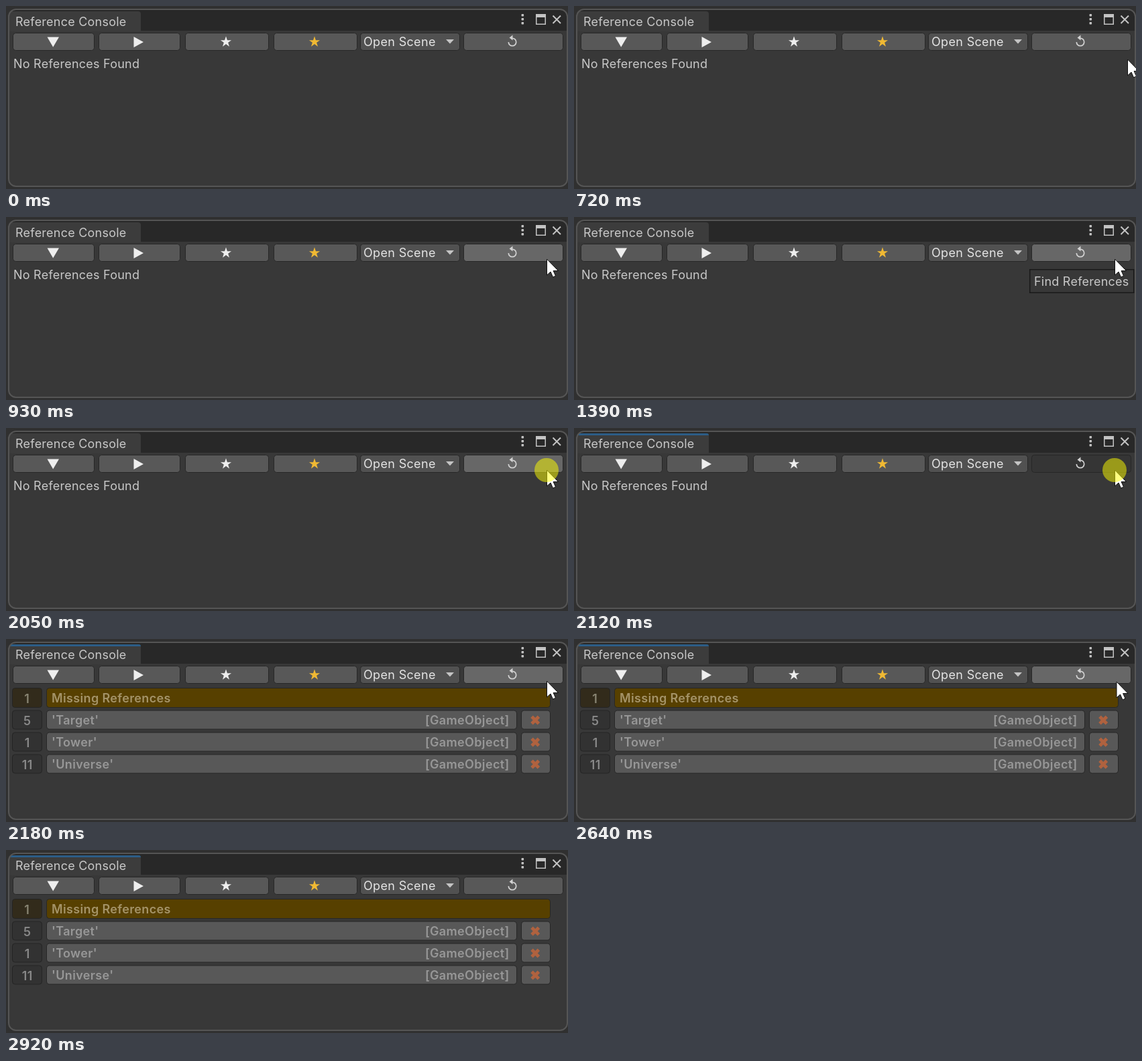
An HTML page for the animation above (3650 ms loop, 838 by 274 pixels).

```html
<!DOCTYPE html>
<html lang="en">
<head>
<meta charset="utf-8">
<title>Reference Console</title>
<style>
  html, body { margin: 0; width: 100%; height: 100%; overflow: hidden; background: #303030; }
  svg { display: block; width: 838px; height: 274px; }
  text { font: 18px Inter, sans-serif; letter-spacing: .23px; fill: #c8c8c8; white-space: pre; }
  .bold { font-weight: 600; letter-spacing: .35px; fill: #979797; }
  .end { text-anchor: end; }
  .mid { text-anchor: middle; }
</style>
</head>
<body>
<svg viewBox="0 0 838 274">
  <rect x="4" y="5" width="833" height="265" rx="11" fill="#383838"/>
  <path d="M5 37V16Q5 6 15 6H826Q836 6 836 16V37Z" fill="#282828"/>
  <path d="M5 38V12Q5 8 9 8H197Q201 8 201 12V38Z" fill="#3c3c3c"/>
  <path id="focus" d="M6 11Q6 8 9 8H198Q201 8 201 11Z" fill="#2c5d87"/>
  <rect x="4" y="5" width="833" height="265" rx="11" fill="none" stroke="#555" stroke-width="2"/>
  <text x="14" y="30">Reference Console</text>
  <g fill="#c4c4c4">
    <rect x="768.5" y="12" width="3.6" height="3.6" rx="1"/>
    <rect x="768.5" y="18" width="3.6" height="3.6" rx="1"/>
    <rect x="768.5" y="24" width="3.6" height="3.6" rx="1"/>
    <path d="M790 12H805V28H790ZM791.5 17V26.5H803.5V17Z" fill-rule="evenodd"/>
  </g>
  <path d="M815.5 14.5L827 26M827 14.5L815.5 26" stroke="#c4c4c4" stroke-width="2"/>

  <g id="toolbar"></g>
  <g fill="#eee">
    <path d="M61.5 46.5H79L70.2 61.5Z"/>
    <path d="M190.5 46V62L205 54Z"/>
    <path id="star"/>
    <use href="#star" x="132" id="gold"/>
    <path d="M656 50H668L662 56.5Z" fill="#c4c4c4"/>
    <path d="M755.5 43.5V51.5L750.5 47.5Z" fill="#d2d2d2"/>
  </g>
  <path d="M749.3 54A5.7 5.7 0 1 0 755 48.3" fill="none" stroke="#d2d2d2" stroke-width="1.7"/>
  <text x="533" y="60" style="fill:#e4e4e4;letter-spacing:.33px">Open Scene</text>

  <text id="empty" x="11" y="93">No References Found</text>
  <g id="results"></g>
  <g id="tooltip">
    <rect x="679.7" y="78.7" width="155" height="34.6" fill="#383838" stroke="#191919" stroke-width="1.5"/>
    <text x="686" y="103">Find References</text>
  </g>
  <path id="cursor" d="M0 0V24L5.5 19L9 27L13 25.2L9.6 17.5H17Z" fill="#fff" stroke="#111"/>
  <circle id="click" cx="806" cy="63" r="18" fill="#ff0" fill-opacity=".5"/>
</svg>
<script>
const LOOP = 3650;
const PRESS = 2050, DOWN = 2120, RELEASE = 2180;
const $ = id => document.getElementById(id);

// Cursor tip positions: [time, x, y]; no position means the pointer is outside
const pointer = [
  [0], [720, 825.5, 80], [790, 815, 71], [860, 808.5, 65], [930, 806.5, 63],
  [2640, 809, 64], [2710, 816, 66], [2780, 825, 69], [2850, 833, 72], [2920]
];

const box = (left, top, right, bottom, fill = '#585858', edge = '#272727') =>
  `<rect x="${left - .5}" y="${top - .5}" width="${right - left + 1}" height="${bottom - top + 1}"
    rx="4" fill="${fill}" stroke="${edge}"/>`;
const label = (x, y, text, cls = '', fill = '') =>
  `<text x="${x}" y="${y}" class="bold ${cls}" style="fill:${fill}">${text}</text>`;

$('toolbar').innerHTML = [[11, 131], [139, 259], [268, 391], [400, 523], [529, 676, '#515151'], [683, 830]]
  .map(([left, right, fill]) => box(left, 41, right, 66, fill)).join('');
const refresh = $('toolbar').lastElementChild;

$('star').setAttribute('d', 'M' + Array.from({ length: 10 }, (_, i) => {
  const radius = i % 2 ? 3.3 : 8.5, angle = i * Math.PI / 5;
  return [328 + radius * Math.sin(angle), 53.8 - radius * Math.cos(angle)].map(v => v.toFixed(2));
}).join('L') + 'Z');
const gold = $('star').cloneNode();
gold.removeAttribute('id');
gold.setAttribute('transform', 'translate(132)');
gold.setAttribute('fill', '#f0b933');
$('gold').replaceWith(gold);

const row = ([count, name], i) => {
  const top = 107.5 + i * 33, bottom = top + 27, base = top + 20;
  return box(10, top, 53, bottom, '#323232', '#242424') + label(31.7, base + 1, count, 'mid', '#888') +
    box(61, top, 761, bottom) + label(68, base, `'${name}'`) + label(750.5, base, '[GameObject]', 'end') +
    box(769, top, 811, bottom) +
    `<path d="M784 ${top + 8.8}l10.4 10.4m0 -10.4l-10.4 10.4" stroke="#b0623f" stroke-width="5"/>`;
};
$('results').innerHTML =
  box(10, 74, 53, 102, '#322b1b', '#242424') + label(31.2, 96, 1, 'mid', '#888472') +
  box(61, 74, 811, 102, '#574000') + label(68, 95, 'Missing References', '', '#a49368') +
  [[5, 'Target'], [1, 'Tower'], [11, 'Universe']].map(row).join('');

const show = (id, visible) => $(id).style.display = visible ? '' : 'none';

function draw(now) {
  const t = now % LOOP;
  const [, x, y] = pointer.findLast(step => step[0] <= t);
  const inside = x !== undefined;
  const hover = inside && x < 830 && y < 66;
  const pressed = t >= DOWN && t < RELEASE;
  const found = t >= RELEASE;

  show('focus', t >= DOWN);
  show('empty', !found);
  show('results', found);
  show('tooltip', t >= 1390 && t < PRESS);
  show('click', t >= PRESS && t < RELEASE);
  show('cursor', inside);
  if (inside) $('cursor').setAttribute('transform', `translate(${x} ${y})`);
  refresh.setAttribute('fill', pressed ? '#353535' : hover ? '#676767' : '#585858');
  requestAnimationFrame(draw);
}
requestAnimationFrame(draw);
</script>
</body>
</html>
```
